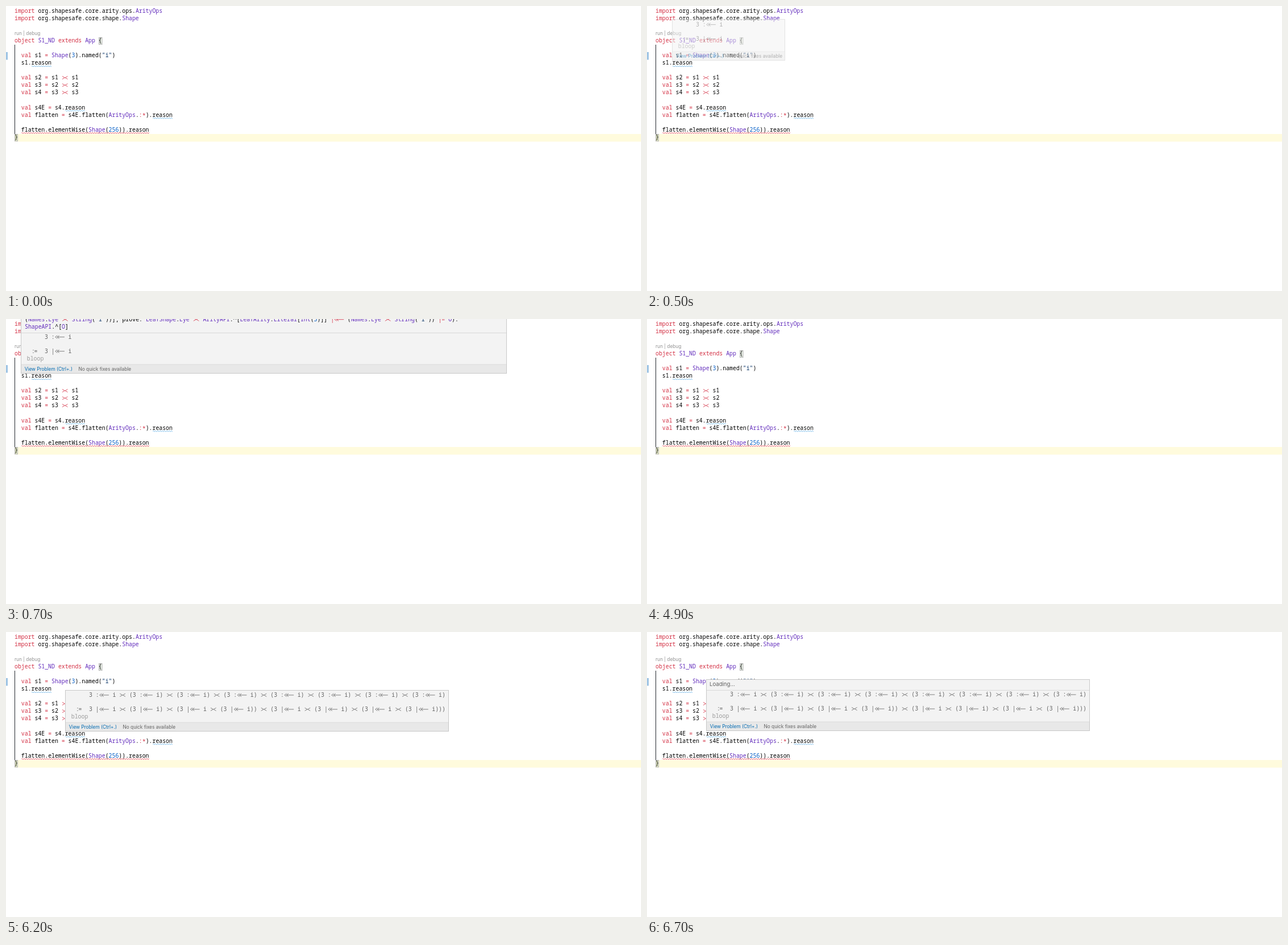
An HTML page for the animation above (8000 ms loop, 1117x501 px).

```html
<!DOCTYPE html>
<html lang="en">
<head>
<meta charset="utf-8">
<title>Shape reasoning in the editor</title>
<style>
  html, body { margin: 0; width: 100%; height: 100%; overflow: hidden; background: #fff; }
  svg { display: block; width: 1117px; height: 501px; }
  text { font: 500 9.857px "Noto Sans Mono", "DejaVu Sans Mono", monospace; white-space: pre; fill: #000; }
  .key { fill: #d32f43; }
  .type { fill: #622cbc; }
  .num { fill: #005cc5; }
  .str { fill: #032f62; }
  .hint { fill: #616161; font-weight: 400; }
  .faint { fill: #9b9b9b; font-weight: 400; }
  .ui { font: 8.3px Inter, "Open Sans", sans-serif; fill: #616161; }
  .lens { fill: #919191; }
  .link { fill: #006ab1; }
  .load { font-size: 9.6px; }
  path { fill: none; stroke-width: .8; }
</style>
</head>
<body>
<svg id="stage" viewBox="0 0 1117 501"></svg>
<script>
const stage = document.getElementById('stage');
const COL = 5.914, ROW = 13.04, LEFT = 15;
const KEYWORDS = ['import', 'object', 'extends', 'val'];
const COLORS = { key: '#d32f43', hint: '#616161' };
const TOKEN = /"[^"]*"|[A-Za-z_]\w*|\d+|<<-|><|\|=|:\*|:=|=|\|(?=<)|\s+|./g;

function add(parent, tag, attrs, content) {
  const el = document.createElementNS('http://www.w3.org/2000/svg', tag);
  for (const k in attrs) el.setAttribute(k, attrs[k]);
  if (content) el.textContent = content;
  parent.append(el);
  return el;
}
const rect = (g, x, y, width, height, fill, stroke = 'none') =>
  add(g, 'rect', { x, y, width, height, fill, stroke });
const label = (g, x, y, cls, content) => add(g, 'text', { x, y, class: cls }, content);

function classOf(t) {
  if (KEYWORDS.includes(t)) return 'key';
  if (/^[A-Z]/.test(t)) return 'type';
  if (/^\d/.test(t)) return 'num';
  if (t[0] === '"') return 'str';
  return /^(<<-|><|\|=|:\*|:=|=|\|)$/.test(t) ? 'key' : '';
}

// The three-column "<<-" ligature.
function arrow(g, x, y, cls) {
  const c = y - 3.3;
  let d = `M${x + 4.3} ${c}H${x + 17.2}`;
  for (const o of [1, 4.3]) d += `M${x + o + 3.6} ${c - 2.7}L${x + o} ${c}L${x + o + 3.6} ${c + 2.7}`;
  add(g, 'path', { d, stroke: COLORS[cls] });
}

// The "><" ligature: two wide angles whose tips meet.
function cross(g, x, y, cls) {
  const c = y - 3.3, m = x + COL;
  const d = `M${m - 4.8} ${c - 2.6}L${m - .3} ${c}L${m - 4.8} ${c + 2.6}` +
            `M${m + 4.8} ${c - 2.6}L${m + .3} ${c}L${m + 4.8} ${c + 2.6}`;
  add(g, 'path', { d, stroke: COLORS[cls] });
}

// Writes a line token by token on the column grid.
function code(g, x, y, line, plain) {
  for (const m of line.matchAll(TOKEN)) {
    const t = m[0], tx = x + m.index * COL, cls = plain || classOf(t);
    if (!t.trim()) continue;
    if (t === '<<-') arrow(g, tx, y, cls);
    else if (t === '><') cross(g, tx, y, cls);
    else if (t === ':=') {
      label(g, tx + .7, y, cls, ':');
      label(g, tx + COL - .7, y, cls, '=');
    } else if (t === ':*') {
      label(g, tx, y, cls, ':');
      label(g, tx + COL, y + 1.7, cls, '*');
    } else label(g, tx, y, cls, t);
  }
}

function squiggle(x0, x1, y, stroke) {
  let d = `M${x0} ${y + 1}`;
  for (let x = x0 + 1, i = 0; x <= x1; x += 2, i++) d += `L${x} ${y + (i % 2 ? 1.8 : 0)}`;
  add(stage, 'path', { d, stroke });
}

const LINES = [
  'import org.shapesafe.core.arity.ops.ArityOps',
  'import org.shapesafe.core.shape.Shape', '', '',
  'object S1_ND extends App {', '',
  '  val s1 = Shape(3).named("i")',
  '  s1.reason', '',
  '  val s2 = s1 >< s1',
  '  val s3 = s2 >< s2',
  '  val s4 = s3 >< s3', '',
  '  val s4E = s4.reason',
  '  val flatten = s4E.flatten(ArityOps.:*).reason', '',
  '  flatten.elementWise(Shape(256)).reason',
  '}'
];

function drawEditor() {
  rect(stage, 0, 0, 1117, 501, '#fff');
  rect(stage, 15, 225, 1102, 13.4, '#fffbdd');
  rect(stage, 1, 81, 1.2, 13.5, '#2b7fc4');
  rect(stage, 15, 68, 1, 157, '#24292e');
  rect(stage, 163.5, 55.5, 5.5, 12, '#e9f0e6', '#b5b5b5');
  rect(stage, 15.5, 225.5, 5, 12, '#e6ecc8', '#b5b5b5');
  LINES.forEach((line, i) => code(stage, LEFT, 12 + ROW * i, line));
  label(stage, LEFT, 51, 'ui lens', 'run | debug');
  const blue = '#62b0e8';
  squiggle(45, 80, 105, blue);
  squiggle(104, 139, 183.3, blue);
  squiggle(258, 293, 196.4, blue);
  squiggle(27, 252, 222.4, '#e5343d');
}

// x, top, right, bottom of the box; dy nudges the message rows.
function popup(x, top, right, bottom, rows, dy = 0, rule = 0) {
  const g = add(stage, 'g', { opacity: 0 }), tx = x + 6, w = right - x;
  rect(g, x, top, w, bottom - top, '#f3f3f3');
  rect(g, x, bottom - 15.5, w, 15.5, '#e8e8e8');
  rect(g, x, bottom - 16, w, 1, '#dcdcdc');
  if (rule) rect(g, x, rule, w, 1, '#d8d8d8');
  rect(g, x, top, w, bottom - top, 'none', '#c8c8c8');
  code(g, tx, bottom - 60.3 + dy, rows[0], 'hint');
  code(g, tx, bottom - 35.3 + dy, rows[1], 'hint');
  label(g, tx + 4.3, bottom - 22.6 + dy, 'faint', 'bloop');
  label(g, tx + .2, bottom - 4.5, 'ui link', 'View Problem (Ctrl+.)');
  label(g, tx + 95, bottom - 4.5, 'ui', 'No quick fixes available');
  return g;
}

drawEditor();

const a = '3 :<<- i', b = '3 |<<- i';
const short = ['      ' + a, '  :=  ' + b];
const pair = `${b} >< (${b})`;
const long = [
  '      ' + a + ` >< (${a})`.repeat(7),
  `  :=  ${pair} >< (${pair}) >< (${pair} >< (${pair}))`
];

const small = popup(44.5, 23.5, 242.5, 95.5, short, .8);
const wide = popup(26.5, -20, 880.5, 95.5, short, -.2, 24);
code(wide, 33, 4.1,
  '(Names.Eye >< String("i"))], prove: LeafShape.Eye >< ArityAPI.^[LeafArity.Literal[Int(3)]] |<<- (Names.Eye >< String("i")) |= O):');
code(wide, 33, 16.6, 'ShapeAPI.^[O]');
const deep = popup(104.5, 102.5, 778.5, 174.5, long);
const loading = popup(104.5, 83.5, 778.5, 173.5, long, .2, 102);
label(loading, 110, 95.4, 'ui load', 'Loading...');

// start time, visible popup, opacity
const STEPS = [
  [0], [500, small, .5], [600, small, 1], [700, wide, 1], [4900],
  [6100, deep, .5], [6200, deep, 1], [6700, loading, 1]
];
const POPUPS = [small, wide, deep, loading];

function tick() {
  const t = performance.now() % 8000;
  const [, shown, opacity] = STEPS.findLast(s => s[0] <= t);
  for (const p of POPUPS) p.setAttribute('opacity', p === shown ? opacity : 0);
  requestAnimationFrame(tick);
}
tick();
</script>
</body>
</html>
```
